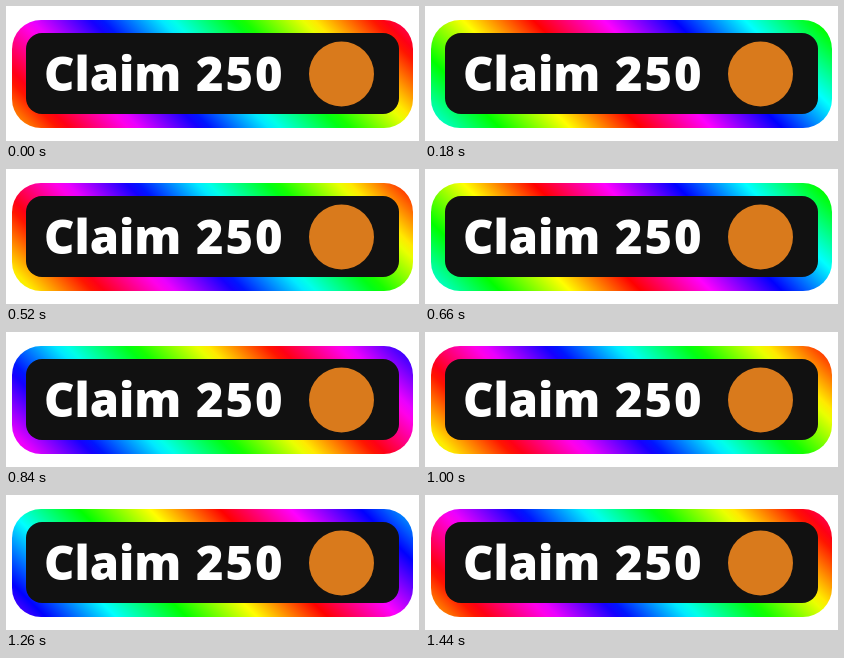
An HTML page with a canvas for the animation above (1.46 s loop, 413x135 px).

```html
<!DOCTYPE html>
<html lang="en">
<head>
<meta charset="utf-8">
<title>Claim button</title>
<style>
  html, body { margin: 0; width: 100%; height: 100%; overflow: hidden; background: #fff; }
  canvas { display: block; }
</style>
</head>
<body>
<canvas id="stage" width="413" height="135"></canvas>
<script>
const ctx = document.getElementById('stage').getContext('2d');
const LOOP = 1460, STEP = 20, CYCLE = 480;
const PERIOD = 423;      // horizontal length of one rainbow
const START_HUE = 305;   // hue at (20, 20) at time 0

function roundBox(x, y, w, h, r, fill) {
  ctx.fillStyle = fill;
  ctx.beginPath();
  ctx.roundRect(x, y, w, h, r);
  ctx.fill();
}

// Diagonal rainbow: the hue falls towards the upper right and rises with time.
function rainbow(time) {
  const hue = START_HUE + 360 * time / CYCLE;
  const span = 3 * PERIOD, x0 = 20 - PERIOD, y0 = 20;
  const g = ctx.createLinearGradient(x0, y0, x0 + span / 2, y0 - span / 2);
  for (let i = 0; i <= 108; i++) {
    g.addColorStop(i / 108, `hsl(${(hue - i * 10 + 2160) % 360} 100% 50%)`);
  }
  return g;
}

function word(text, x, spacing) {
  ctx.letterSpacing = spacing;
  ctx.fillText(text, x, 84.5);
}

function draw(now) {
  const time = Math.floor(now % LOOP / STEP) * STEP;
  ctx.clearRect(0, 0, 413, 135);
  roundBox(6, 14, 401, 108, 29, rainbow(time));
  roundBox(20, 27, 373, 81, 16, '#111');
  ctx.fillStyle = '#fff';
  ctx.font = '800 47px "Open Sans", "Noto Sans", sans-serif';
  word('Claim', 38, '0px');
  word('250', 190, '2px');
  ctx.fillStyle = '#d97a1c';
  ctx.beginPath();
  ctx.arc(335.5, 68, 32.5, 0, 2 * Math.PI);
  ctx.fill();
}

function tick() {
  draw(performance.now());
  requestAnimationFrame(tick);
}
tick();
</script>
</body>
</html>
```
